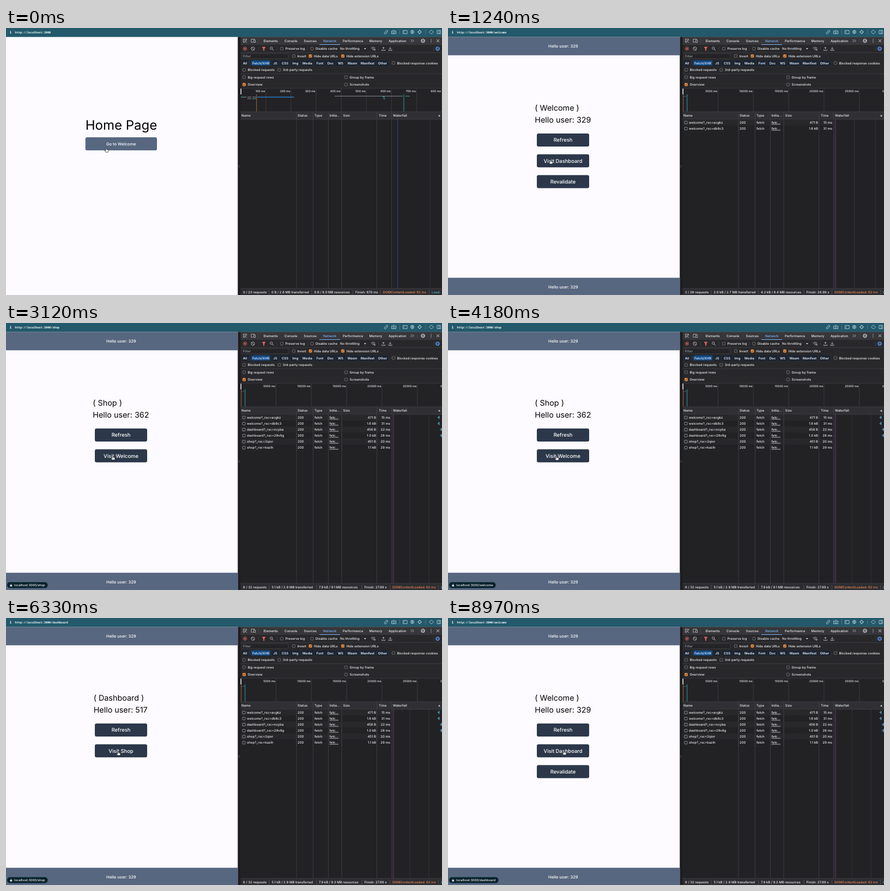
These frames come from a looping animation (800 by 491 pixels, 9 s). An HTML page:

```html
<!DOCTYPE html>
<html lang="en">
<head>
<meta charset="utf-8">
<title>Network panel demo</title>
<style>
html, body { margin: 0; width: 100%; height: 100%; overflow: hidden; background: #fdfbff; }
svg { display: block; width: 800px; height: 491px; }
text { font-family: Inter, "Liberation Sans", sans-serif; text-rendering: geometricPrecision; }
</style>
</head>
<body>
<svg id="stage" viewBox="0 0 800 491">
  <g id="base"></g>
  <g id="view"></g>
  <path id="hand" d="M-.9 .2Q0 -.7 .8 .2V3L3.3 3.6Q4.2 3.9 4 5L3.4 7.8H-1.2L-3.2 4.6Q-3 3.6 -2 4.1L-.9 5Z" fill="#fff" stroke="#15181d" stroke-width=".7" stroke-linejoin="round"/>
</svg>
<script>
const $ = id => document.getElementById(id);
const LOOP = 9000;
const INK = '#eeeff1', ICON = '#c9cbd0', RULE = '#45464b';

// Drawing helpers: each returns SVG markup.
const rect = (x, y, w, h, fill, more = '') =>
  `<rect x="${x}" y="${y}" width="${w}" height="${h}" fill="${fill}" ${more}/>`;
const text = (s, x, y, { size = 6, fill = INK, anchor = 'start', weight = 500, more = '' } = {}) =>
  `<text x="${x}" y="${y}" font-size="${size}" fill="${fill}" text-anchor="${anchor}" font-weight="${weight}" ${more}>${s}</text>`;
const path = (d, stroke = ICON, width = .8, fill = 'none') =>
  `<path d="${d}" stroke="${stroke}" stroke-width="${width}" fill="${fill}"/>`;
const circle = (x, y, r, stroke = ICON, fill = 'none', width = .8) =>
  `<circle cx="${x}" cy="${y}" r="${r}" stroke="${stroke}" stroke-width="${width}" fill="${fill}"/>`;
const vline = (x, y1, y2, color = RULE, w = .7) => path(`M${x} ${y1}V${y2}`, color, w);
const hline = y => path(`M430 ${y}H800`, RULE, .7);
const mono = `style="font-family:'Noto Sans Mono','DejaVu Sans Mono',monospace"`;

const check = (x, y, label, on) =>
  rect(x - 2.6, y - 2.6, 5.2, 5.2, on ? '#f0913f' : '#2b2b2e', `rx="1" stroke="${on ? '#f0913f' : '#85878c'}" stroke-width=".7"`) +
  (on ? path(`M${x - 1.6} ${y}l1.2 1.3l2.1 -2.6`, '#222', .9) : '') +
  text(label, x + 6.4, y + 2.2);

const gear = (x, y, color) =>
  circle(x, y, 2.7, color, 'none', 1.1) + circle(x, y, .8, color, color, .3) +
  `<circle cx="${x}" cy="${y}" r="3.6" fill="none" stroke="${color}" stroke-width="1" stroke-dasharray="1.4 1.43"/>`;

function topBar() {
  const c = '#c5dde4';
  return rect(0, 0, 800, 16.5, '#23596b') +
    path('M696.2 8.7l2.4 -2.4M696 6.2l1.6 -1.6q1.5 -1 2.5 0t0 2.5l-1.3 1.4M698.7 8.9l-1.6 1.6q-1.5 1 -2.5 0t0 -2.5l1.3 -1.4', c) +
    path('M707.5 5.5h2l1 -1.3h2l1 1.3h2v5h-8z', c) + circle(711.5, 7.8, 1.5, c) +
    vline(722.5, 3, 12, '#5b8796') +
    path('M728.5 4.5h7.5v6h-7.5zM730 6.2l1.4 1.2l-1.4 1.2', c) +
    circle(745.5, 7.3, 3, c) + path('M742.5 7.3h6M745.5 4.3v6M743.5 5q2 1.6 4 0M743.5 9.6q2 -1.6 4 0', c, .6) +
    circle(759, 7.3, 2.6, c) + path('M759 3.3v2.5M759 8.8v2.5M755 7.3h2.5M760.5 7.3h2.5', c) +
    vline(770, 3, 12, '#5b8796') +
    path('M779.5 4.3l-3 3l3 3M781.5 4.3l3 3l-3 3M779.5 4.3h2M779.5 10.3h2', c) +
    path('M791 4.3h6.3v6.2h-6.3zM794.8 4.3v6.2', c) +
    text('i', 6.5, 10, { size: 6.5, fill: '#eef7fa', weight: 700, more: mono });
}

function toolbars() {
  const tabs = [['Elements', 472.5], ['Console', 511], ['Sources', 546.5], ['Network', 582],
    ['Performance', 618], ['Memory', 666.5], ['Application', 702]];
  const pills = [['All', 433, 11], ['Fetch/XHR', 450, 35], ['JS', 488, 12], ['CSS', 503, 18], ['Img', 523, 16],
    ['Media', 542, 22], ['Font', 567, 18], ['Doc', 587, 17], ['WS', 606, 16], ['Wasm', 624, 23],
    ['Manifest', 649, 29], ['Other', 681, 20]];
  return rect(425.5, 16.5, 375, 475, '#28282b') +
    rect(425.5, 16.5, 5, 475, '#1d1d20') + path('M426.8 252v5M428.5 252v5', '#55565a', .6) +
    rect(430.5, 16.5, 370, 14.5, '#37373b') +
    path('M438.5 26.3h-3v-5.8h6v2.5M438 23l4 4M438 23v2.7M438 23h2.7') +
    path('M450 25v-4.5h6.5M449 26h4.5M454.5 22h3v4.5h-3z') + vline(463, 19, 28) +
    tabs.map(([s, x]) => text(s, x, 25.8, { fill: s == 'Network' ? '#7eb5fa' : INK })).join('') +
    rect(575, 30, 38, 1, '#7eb5fa') +
    path('M742.5 21l2.5 2.5l-2.5 2.5M745.8 21l2.5 2.5l-2.5 2.5') + vline(755, 19, 28) +
    gear(765, 23.5, ICON) + [21, 23.5, 26].map(y => circle(780, y, .7, 'none', ICON)).join('') +
    path('M790 21l5 5M795 21l-5 5', '#d8dade', 1) +

    circle(438.5, 38, 3.2, '#e46962') + rect(437.1, 36.6, 2.8, 2.8, '#e46962') +
    circle(453, 38, 3.2) + path('M450.8 35.8l4.4 4.4') + vline(464, 34, 42) +
    path('M470 35h6l-2.3 3v3.4h-1.4v-3.4z', '#e46962', .7, '#e46962') +
    circle(486.8, 37, 2.2) + path('M488.4 38.6l2.7 2.7', ICON, 1) + vline(497, 34, 42) +
    check(506, 38, 'Preserve log') + vline(553, 34, 42) + check(561.5, 38, 'Disable cache') +
    text('No throttling', 613, 40.2) + path('M656.8 37h4l-2 2.6z', 'none', 0, '#d5d7db') +
    path('M669.5 37q4 -3.4 8 0M671 38.6q2.5 -2 5 0M672.5 40.2q1 -.8 2 0') + circle(676.5, 40, 1.2) + vline(683.5, 34, 42) +
    path('M692.5 39.5v-4.5M690.5 37l2 -2l2 2M689.5 39.5v1.8h6v-1.8') +
    path('M705 34.8v4.5M703 37.4l2 2l2 -2M702 39.5v1.8h6v-1.8') + vline(785, 34, 42) + gear(792, 38, '#5c9df5') + hline(45) +

    rect(432, 47, 86, 9.5, '#242427', 'rx="1" stroke="#4a4b50" stroke-width=".6"') +
    text('Filter', 434.5, 54.2, { fill: '#9a9ca1' }) +
    check(528, 51.5, 'Invert') + check(558.5, 51.5, 'Hide data URLs', 1) + check(618, 51.5, 'Hide extension URLs', 1) +
    pills.map(([s, x, w]) => {
      const on = s == 'Fetch/XHR';
      return rect(x, 59.5, w, 9.5, on ? '#114a83' : '#182434', 'rx="2"') +
        text(s, x + w / 2, 66.5, { anchor: 'middle', weight: 600, fill: on ? '#d5e6ff' : INK });
    }).join('') + vline(447, 60.5, 68) +
    check(711, 64.3, 'Blocked response cookies') +
    check(437, 77, 'Blocked requests') + check(501.3, 77, '3rd-party requests') + hline(84) +
    check(437, 90.5, 'Big request rows') + check(624, 90.5, 'Group by frame') +
    check(437, 104, 'Overview', 1) + check(624, 104, 'Screenshots') + hline(111) +

    rect(430.5, 111.5, 370, 42.5, '#232326') + rect(430.3, 111.5, 1.7, 10.5, '#d8dade') +
    rect(430.5, 154, 370, 14, '#303034') + hline(154) + rect(430.5, 168, 370, 311, '#222225') + hline(168) +
    [533, 563.5, 591.5, 616, 680.5, 707.5].map(x => vline(x, 154, 479)).join('') +
    [['Name', 432], ['Status', 535], ['Type', 566], ['Initia…', 593.5], ['Size', 618.5], ['Time', 684], ['Waterfall', 710]]
      .map(([s, x]) => text(s, x, 163)).join('') +
    path('M793 162.6h4l-2 -3z', 'none', 0, '#d5d7db') +
    rect(430.5, 479, 370, 12, '#2d2d31') + hline(479);
}

const ROWS = [['welcome?_rsc=acgkz', '471 B', 15], ['welcome?_rsc=db8c3', '1.6 kB', 31],
  ['dashboard?_rsc=ncyba', '456 B', 22], ['dashboard?_rsc=29v9g', '1.0 kB', 28],
  ['shop?_rsc=2qior', '451 B', 20], ['shop?_rsc=kazih', '1.1 kB', 29]];

function tableRow([name, size, ms], i, marks) {
  const y = 173.6 + i * 11.1, base = y + 2.2, right = { anchor: 'end' }, mark = marks[i >> 1];
  return (i % 2 ? '' : rect(430.5, y - 5.5, 277, 11.1, '#28282b')) +
    rect(434, y - 2.3, 5, 5, 'none', 'rx=".6" stroke="#b5b7bc" stroke-width=".7"') +
    text(name, 442, base) + text('200', 535, base) + text('fetch', 566, base) +
    text('fetc…', 593.5, base, { more: 'text-decoration="underline"' }) +
    text(size, 679, base, right) + text(ms + ' ms', 705, base, right) +
    (mark ? rect(mark - 2, y - .7, 2, 1.4, '#8b979d') + rect(mark, y - 2.7, 1.5, 5.4, '#3fb0cc') : '') +
    [533, 563.5, 591.5, 616, 680.5].map(x => vline(x, y - 5.6, y + 5.6)).join('');
}

function overview(home) {
  const step = home ? 46.1 : 64.8, unit = home ? 100 : 5000;
  let out = '';
  for (let i = 1; i * step < 370; i++) {
    const x = 430.7 + i * step;
    out += vline(x, 111.5, 153.5) + text(i * unit + ' ms', x - 1.4, 118.3, { size: 5.2, anchor: 'end' });
  }
  if (!home) {
    return out + text('3', 796.5, 118.3, { size: 5.2 }) +
      vline(431.5, 122, 153.5, '#a8683f', .9) + vline(438.7, 122, 153.5, '#2c9aac', 1) +
      rect(432, 125.6, 1.5, 1, '#4685b5') + rect(435.5, 125, 1.6, 1, '#8b9295');
  }
  const bars = [[431, 127, 10, '#4f8f78'], [443, 127, 7, '#75797c'], [452, 127, 7, '#75797c'], [443, 130, 7, '#75797c'],
    [452, 130, 7, '#4f8f78'], [461, 127, 67.5, '#2b86d6'], [603, 125.3, 125, '#70757a'], [733, 125.3, 7.5, '#408d7d'],
    [691, 126.8, 4, '#35a3b5'], [692.5, 130, 3, '#35a3b5']];
  return out + bars.map(([x, y, w, c]) => rect(x, y - .6, w, 1.3, c)).join('') +
    vline(459.8, 122, 153.5, '#a8683f', 1) + vline(730, 122, 153.5, '#2c9aac', 1);
}

const SUMMARY = {
  0: ['0 / 23 requests', '0 B / 2.6 MB transferred', '0 B / 8.0 MB resources', 'Finish: 670 ms'],
  2: ['2 / 26 requests', '2.0 kB / 2.7 MB transferred', '4.2 kB / 8.4 MB resources', 'Finish: 24.99 s'],
  4: ['4 / 29 requests', '3.5 kB / 2.8 MB transferred', '5.9 kB / 8.7 MB resources', 'Finish: 26.39 s'],
  6: ['6 / 32 requests', '5.1 kB / 2.9 MB transferred', '7.9 kB / 9.1 MB resources', 'Finish: 27.89 s']
};

function network(count, late) {
  const home = !count;
  const xs = home ? [435, 487, 565.5, 641, 691.5, 781] : [435, 487.5, 574, 657.5, 709, 798];
  const labels = [...SUMMARY[count], 'DOMContentLoaded: 62 ms', 'Load:'];
  if (late) labels[2] = labels[2].replace('9.1', '9.3');
  const colors = { 4: '#e8875a', 5: '#4fb9d6' };
  const grid = home ? [778] : { 2: [745.5, 784], 4: [743.3, 780], 6: [741.3, 776] }[count];
  const marks = { 4: [797.5], 6: [793.8, 798.3] }[count] || [];
  return overview(home) + grid.map(x => vline(x, 168, 479, '#3a3b40')).join('') +
    (home ? vline(718.5, 168, 479, '#39489c', .9) : vline(709.5, 168, 479, '#28368f', .8) + vline(711.2, 168, 479, '#8c2a35', .9)) +
    ROWS.slice(0, count).map((r, i) => tableRow(r, i, marks)).join('') +
    labels.map((s, i) => (i ? vline(xs[i] - 4.5, 482, 490, '#5b5c61') : '') +
      text(s, xs[i], 488, { fill: colors[i] || INK })).join('');
}

const button = (label, y) => rect(163, y, 96, 24, '#2c384a', 'rx="3"') +
  text(label, 211, y + 15.3, { size: 9.4, fill: '#fff', anchor: 'middle' });

const PAGES = {
  welcome: ['Welcome', 329, 159.3, ['Refresh', 'Visit Dashboard', 'Revalidate']],
  dashboard: ['Dashboard', 517, 160.7, ['Refresh', 'Visit Shop']],
  shop: ['Shop', 362, 159.3, ['Refresh', 'Visit Welcome']]
};

function page(name) {
  const url = 'http://localhost:3000' + (name && '/' + name);
  const address = text(url, 16.5, 9.8, { size: 5.22, fill: '#eef7fa', weight: 700, more: mono });
  const small = { size: 7.5, fill: '#fff', anchor: 'middle' };
  if (!name) {
    return address + text('Home Page', 211.5, 186.7, { size: 24, fill: '#000', anchor: 'middle', weight: 400 }) +
      rect(145.7, 201, 131.3, 24, '#586780', 'rx="3"') + text('Go to Welcome', 211.2, 215.8, small);
  }
  const [title, user, x, buttons] = PAGES[name], big = { size: 14.35, fill: '#000', weight: 400 };
  return address + rect(0, 16.5, 425.5, 33.7, '#586780') + rect(0, 459.3, 425.5, 31.7, '#586780') +
    text('Hello user: 329', 211.3, 36.4, small) + text('Hello user: 329', 211.3, 479, small) +
    text(`( ${title} )`, x, 152.2, big) + text('Hello user: ' + user, x, 173.8, big) +
    buttons.map((b, i) => button(b, 194 + i * 38.2)).join('');
}

function bubble(target) {
  if (!target) return '';
  const width = { dashboard: 90.5, shop: 74.5, welcome: 85.5 }[target];
  return rect(2, 476.6, width, 10.8, '#0b2029', 'rx="5" stroke="#23596b" stroke-width=".6"') +
    rect(7.5, 481.7, 3.6, 2.8, '#dfe9ec', 'rx=".6"') + path('M8.2 482v-1.2q1.1 -1.6 2.2 0v1.2', '#dfe9ec', .6) +
    text('localhost:3000/' + target, 15, 484.2, { size: 5.7, fill: '#eef7fa' });
}

// [start time, page, request rows]
const VISITS = [[0, '', 0], [450, 'welcome', 2], [1780, 'dashboard', 4], [2950, 'shop', 6], [4300, 'welcome', 6],
  [5680, 'dashboard', 6], [7050, 'shop', 6], [8400, 'welcome', 6]];
// [start time, hovered link]
const HOVERS = [[0, ''], [1400, 'dashboard'], [2150, 'shop'], [3300, 'welcome'], [4650, 'dashboard'],
  [6030, 'shop'], [7400, 'welcome'], [8750, 'dashboard']];
// [time, x, y]
const MOVES = [[0, 184, 220.5], [450, 184, 220.5], [1050, 188, 242], [1900, 190, 243], [3120, 196, 244],
  [5090, 202, 245], [6330, 206, 245], [7850, 211, 244], [8970, 213, 244], [9000, 213, 244]];

const at = (list, t) => list.findLast(e => e[0] <= t);

function pointer(t) {
  const i = MOVES.findIndex(m => m[0] > t);
  const [t0, x0, y0] = MOVES[i - 1], [t1, x1, y1] = MOVES[i];
  const k = (t - t0) / (t1 - t0), e = k * k * (3 - 2 * k);
  return [x0 + (x1 - x0) * e, y0 + (y1 - y0) * e];
}

let shown = '';
const began = performance.now();
function draw(now) {
  const t = Math.max(0, now - began) % LOOP;
  const [start, name, count] = at(VISITS, t), link = at(HOVERS, t)[1];
  const key = start + link;
  if (key !== shown) {
    $('view').innerHTML = page(name) + bubble(link) + network(count, start >= 4300);
    shown = key;
  }
  $('hand').setAttribute('transform', `translate(${pointer(t)})`);
  requestAnimationFrame(draw);
}

$('base').innerHTML = rect(0, 0, 800, 491, '#fdfbff') + topBar() + toolbars();
draw(began);
</script>
</body>
</html>
```
